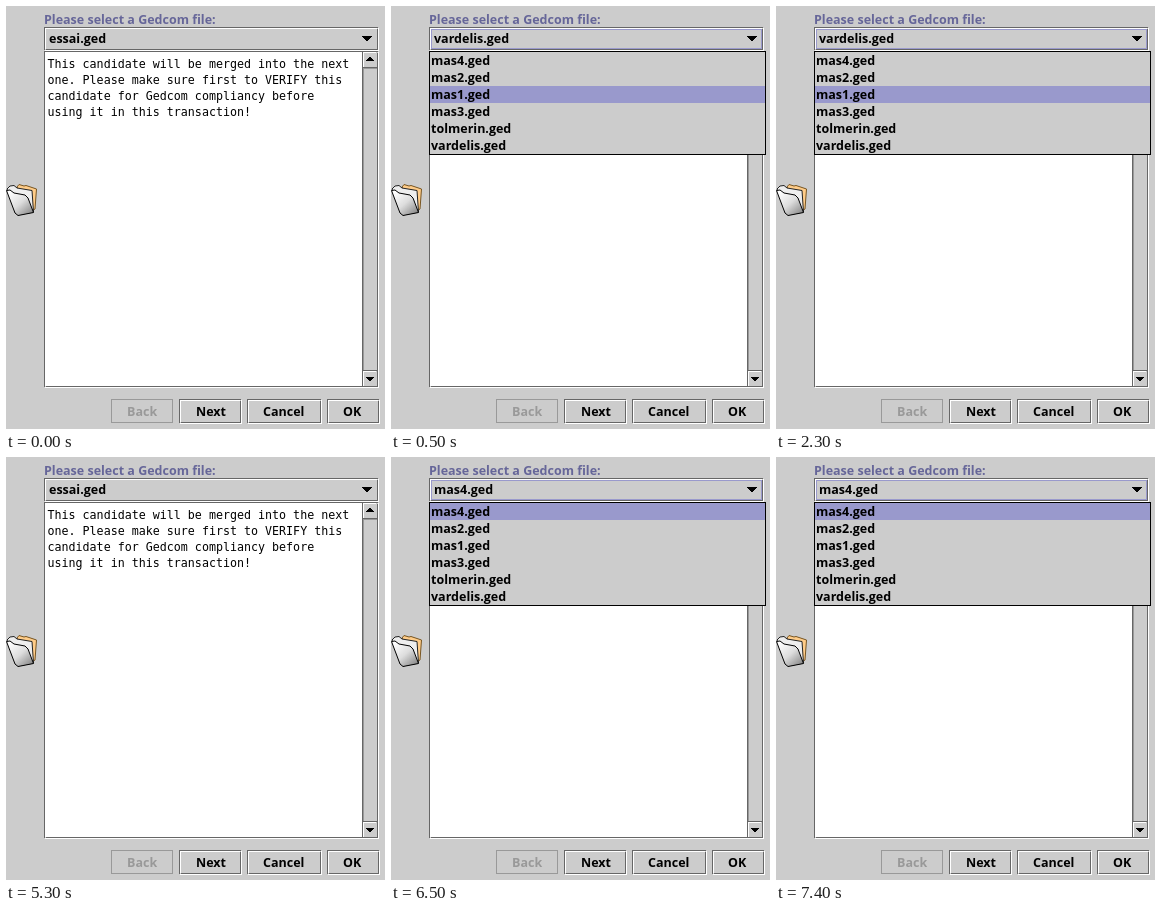
An HTML page with a canvas for the animation above (8 s loop, 379 by 423 pixels).

```html
<!DOCTYPE html>
<html lang="en">
<head>
<meta charset="utf-8">
<title>File chooser</title>
<style>
  html, body { margin: 0; width: 100%; height: 100%; overflow: hidden; background: #ccc; }
  canvas { display: block; }
</style>
</head>
<body>
<canvas id="stage" width="379" height="423"></canvas>
<script>
const ctx = document.getElementById('stage').getContext('2d');
const BOLD = 'bold 12.5px "Open Sans", sans-serif';
const MONO = '11.66px "DejaVu Sans Mono", monospace';
const GREY = '#ccc', DARK = '#666', MID = '#999', LILAC = '#99c';
const LOOP = 8000;

const files = ['mas4.ged', 'mas2.ged', 'mas1.ged', 'mas3.ged', 'tolmerin.ged', 'vardelis.ged'];
const message = [
  'This candidate will be merged into the next',
  'one. Please make sure first to VERIFY this',
  'candidate for Gedcom compliancy before',
  'using it in this transaction!'
];
const steps = [
  { until: 500, value: 'essai.ged' },
  { until: 3500, value: files[5], hover: 2 },
  { until: 6500, value: 'essai.ged' },
  { until: LOOP, value: files[0], hover: 0 }
];

function rect(x, y, w, h, color) {
  ctx.fillStyle = color;
  ctx.fillRect(x, y, w, h);
}

function outline(x, y, w, h, color) {
  ctx.lineWidth = 1;
  ctx.strokeStyle = color;
  ctx.strokeRect(x + 0.5, y + 0.5, w - 1, h - 1);
}

// Etched frame: dark outline, white one pixel down and right, two softened corners
function etched(x, y, w, h, fill = GREY) {
  rect(x, y, w - 1, h - 1, fill);
  outline(x + 1, y + 1, w - 1, h - 1, '#fff');
  outline(x, y, w - 1, h - 1, DARK);
  rect(x + 1, y + h - 2, 1, 1, GREY);
  rect(x + w - 2, y + 1, 1, 1, GREY);
}

function text(str, x, y, color = '#000', font = BOLD) {
  ctx.font = font;
  ctx.fillStyle = color;
  ctx.fillText(str, x, y);
}

// Stepped triangle; its tip is at y and dir points from tip to base
function arrow(cx, y, rows, dir) {
  for (let i = 0; i < rows; i++) rect(cx - i - 1, y + dir * i, 2 * i + 2, 1, '#000');
}

function shape(fill, stroke, ...points) {
  ctx.beginPath();
  points.forEach(([x, y]) => ctx.lineTo(x, y));
  ctx.closePath();
  ctx.fillStyle = fill;
  ctx.fill();
  ctx.strokeStyle = stroke;
  ctx.stroke();
}

function folders() {
  ctx.lineWidth = 1;
  shape('#fc8', '#752', [11, 181], [13, 178.5], [18, 180], [20, 179.5], [30.5, 183], [29, 203], [26, 205]);
  shape('#eee', '#222', [1, 183], [4, 180], [8, 179.5], [11, 182], [26, 184.5], [27.5, 206], [12, 209]);
  const shade = ctx.createLinearGradient(4, 186, 24, 209);
  shade.addColorStop(0, '#fff');
  shade.addColorStop(0.5, '#ddd');
  shade.addColorStop(1, '#888');
  shape(shade, '#000', [0.5, 184.5], [4, 184], [8, 187], [19, 189], [22, 192], [27.5, 206.5], [12, 209.5], [9, 207]);
}

function button(label, x, w, textX, enabled = true) {
  if (enabled) etched(x, 393, w, 25);
  else outline(x, 393, w - 1, 24, MID);
  text(label, textX, 410, enabled ? '#000' : MID);
}

function scrollButton(y) {
  rect(357, y, 14, 15, GREY);
  rect(357, y, 13, 1, '#fff');
  rect(357, y, 1, 15, '#fff');
}

function textArea() {
  etched(38, 45, 335, 337, '#fff');
  rect(356, 46, 15, 334, GREY);
  rect(356, 46, 1, 334, DARK);
  rect(357, 62, 1, 302, MID);
  rect(357, 62, 14, 1, MID);
  scrollButton(46);
  scrollButton(365);
  rect(356, 61, 15, 1, DARK);
  rect(356, 364, 15, 1, DARK);
  arrow(364, 51, 4, 1);
  arrow(364, 374, 4, -1);
}

function comboBox(value, focused) {
  etched(38, 21, 335, 24);
  if (focused) outline(40, 23, 331, 20, LILAC);
  text(value, 43, 37);
  arrow(361, 34, 5, -1);
}

function popup(hover) {
  rect(38, 45, 337, 104, GREY);
  rect(39, 46 + hover * 17, 335, 17, LILAC);
  outline(38, 45, 337, 104, '#000');
  files.forEach((name, i) => text(name, 40, 59 + i * 17));
}

function draw(time) {
  const { value, hover } = steps.find(step => time < step.until);
  const open = hover !== undefined;
  rect(0, 0, 379, 423, GREY);
  text('Please select a Gedcom file:', 38, 18, '#669');
  comboBox(value, open);
  textArea();
  if (open) popup(hover);
  else message.forEach((line, i) => text(line, 41.5, 62 + i * 16, '#000', MONO));
  folders();
  button('Back', 105, 63, 121, false);
  button('Next', 173, 63, 190);
  button('Cancel', 241, 75, 257);
  button('OK', 321, 53, 337);
}

const start = performance.now();
function tick() {
  draw((performance.now() - start) % LOOP);
  requestAnimationFrame(tick);
}
tick();
</script>
</body>
</html>
```
